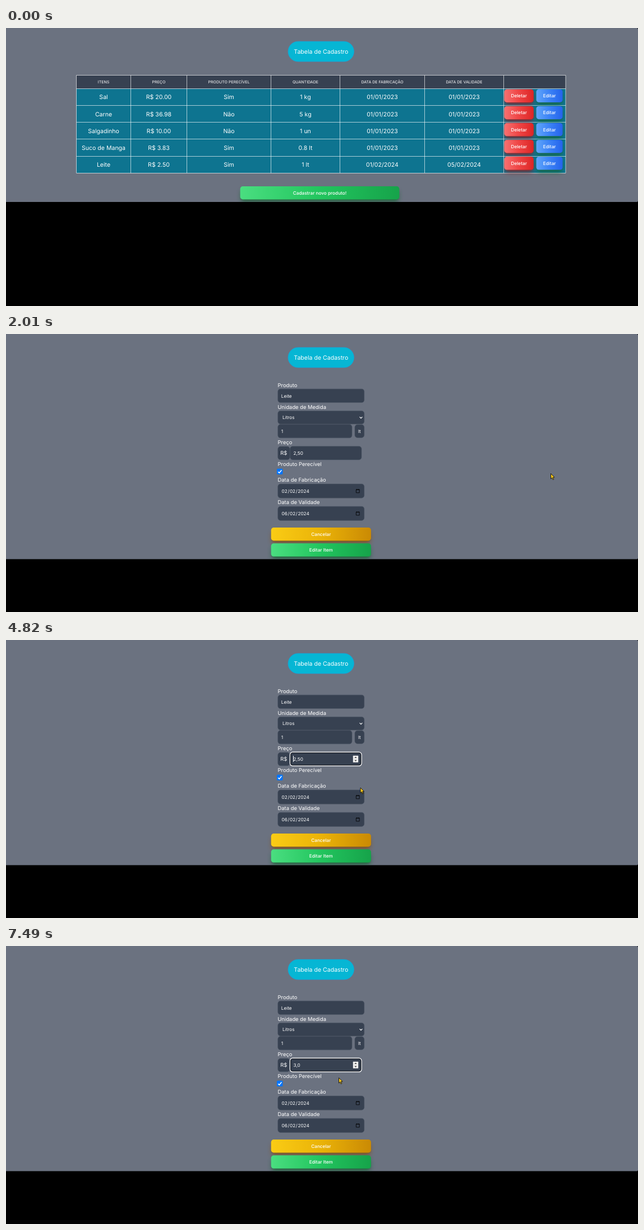
An HTML page for the animation above (8000 ms loop, 1127 px wide and 497 px high).

```html
<!DOCTYPE html>
<html lang="pt-BR">
<head>
<meta charset="utf-8">
<title>Tabela de Cadastro</title>
<style>
  html, body { margin: 0; width: 100%; height: 100%; overflow: hidden; background: #000; }
  svg { display: block; width: 100vw; height: 100vh; }
  text { font-family: Inter, sans-serif; fill: #fff; text-rendering: geometricPrecision; white-space: pre; }
  .medium { font-weight: 500; }
  .field { fill: #374151; stroke: #4b5563; stroke-width: .6; }
  .grid { stroke: #fff; stroke-width: .65; fill: none; }
  .far { filter: blur(4.4px); }
  .near { filter: blur(1.7px); }
</style>
</head>
<body>
<svg id="stage" viewBox="0 0 1127 497">
  <defs id="defs">
    <clipPath id="tableClip"><rect x="-9" width="1136" height="311" rx="2.5"/></clipPath>
    <clipPath id="formClip"><rect x="-9" width="1136" height="402.5" rx="2.5"/></clipPath>
  </defs>
  <rect width="1127" height="497"/>
  <g id="table" clip-path="url(#tableClip)"></g>
  <g id="form" clip-path="url(#formClip)"></g>
  <g id="pointer">
    <circle id="click" r="7.6" fill="#e6e05a" opacity=".5"/>
    <path id="arrow" d="M0 0V9.4L2.1 7.5 3.8 11 5.3 10.3 3.7 6.9 6.6 6.6Z" fill="#f6c51c" stroke="#111" stroke-width=".9" stroke-linejoin="round"/>
    <path id="hand" d="M-.9 .6Q0-.4 .9 .6V5L4.6 5.8Q5.6 6.2 5.4 7.4L4.6 11.8H-.4L-3.2 7.6Q-2.6 6.4-.9 7.6Z" fill="#f6c51c" stroke="#1b1b10" stroke-width=".9" stroke-linejoin="round"/>
    <g id="beam" fill="none">
      <path d="M-2-4.6H2M0-4.6V5M-2 5H2" stroke="#111" stroke-width="2.2"/>
      <path d="M-1.6-4.6H1.6M0-4.6V5M-1.6 5H1.6" stroke="#f0b90f" stroke-width="1"/>
    </g>
  </g>
</svg>
<script>
const LOOP = 8000, STEP = 1000 / 15;
const SM = 8.22, MD = 9.39, LG = 10.57, XS = 7.04;
const $ = id => document.getElementById(id);

function add(parent, tag, attrs, content) {
  const node = document.createElementNS('http://www.w3.org/2000/svg', tag);
  for (const key in attrs) node.setAttribute(key, attrs[key]);
  if (content !== undefined) node.textContent = content;
  parent.append(node);
  return node;
}

function gradient(id, colors, diagonal) {
  const node = add($('defs'), 'linearGradient', { id, x2: 1, y2: diagonal ? 1 : 0 });
  colors.forEach((color, i) => add(node, 'stop', { offset: i / 2, 'stop-color': color }));
}
const blues = ['#60a5fa', '#3b82f6', '#2563eb'];
gradient('red', ['#f87171', '#ef4444', '#dc2626']);
gradient('blue', blues);
gradient('blueHover', blues, true);
gradient('green', ['#4ade80', '#22c55e', '#16a34a']);
gradient('yellow', ['#facc15', '#eab308', '#ca8a04']);

// cy is the middle of the line box
function label(parent, str, x, cy, size, anchor = 'middle', cls = '') {
  return add(parent, 'text', { x, y: cy + size * .36, 'font-size': size, 'text-anchor': anchor, class: cls }, str);
}

const rect = (parent, x, y, width, height, rx, attrs) =>
  add(parent, 'rect', { x, y, width, height, rx, ...attrs });

function button(parent, str, x, y, w, color, shadow) {
  const h = 23.5;
  const tint = { fill: shadow, opacity: .8 };
  rect(parent, x + 1.8, y + 7.7, w - 3.6, h - 3.6, 3, { ...tint, class: 'far' });
  rect(parent, x + 2.3, y + 4.6, w - 4.6, h - 4.6, 3, { ...tint, class: 'near' });
  const face = rect(parent, x, y, w, h, 4.7, { fill: `url(#${color})` });
  label(parent, str, x + w / 2, y + h / 2 + .1, SM, 'middle', 'medium');
  return face;
}

function page(parent) {
  rect(parent, 0, 0, 1127, 497, 0, { fill: '#6b7280' });
  rect(parent, 503, 24, 117.5, 36, 18, { fill: '#06b6d4', stroke: '#189fdc', 'stroke-width': .7 });
  label(parent, 'Tabela de Cadastro', 561.8, 42, LG);
}

function buildTable(g) {
  page(g);
  const cols = [125.5, 222.5, 322.5, 472.5, 595.5, 746.5, 887.5, 998];
  const top = 84.5, first = 108.5, pitch = 30.15, bottom = first + 5 * pitch;
  const heads = ['ITENS', 'PREÇO', 'PRODUTO PERECÍVEL', 'QUANTIDADE', 'DATA DE FABRICAÇÃO', 'DATA DE VALIDADE'];
  const rows = [
    ['Sal', 'R$ 20.00', 'Sim', '1 kg', '01/01/2023', '01/01/2023'],
    ['Carne', 'R$ 36.98', 'Não', '5 kg', '01/01/2023', '01/01/2023'],
    ['Salgadinho', 'R$ 10.00', 'Não', '1 un', '01/01/2023', '01/01/2023'],
    ['Suco de Manga', 'R$ 3.83', 'Sim', '0.8 lt', '01/01/2023', '01/01/2023'],
    ['Leite', 'R$ 2.50', 'Sim', '1 lt', '01/02/2024', '05/02/2024']
  ];
  const middle = i => (cols[i] + cols[i + 1]) / 2;
  rect(g, cols[0], top, 872.5, first - top, 0, { fill: '#374151' });
  rect(g, cols[0], first, 872.5, bottom - first, 0, { fill: '#0e7490' });
  let lines = `M125.5 ${top}H998`;
  for (let i = 0; i <= 5; i++) lines += `M125.5 ${Math.floor(first + i * pitch) + .5}H998`;
  for (const x of cols) lines += `M${x} ${top}V${bottom}`;
  add(g, 'path', { d: lines, class: 'grid' });
  heads.forEach((str, i) => label(g, str, middle(i), 96.3, XS));
  let edit;
  rows.forEach((row, r) => {
    const y = first + r * pitch;
    row.forEach((str, i) => label(g, str, middle(i), y + 15.1, LG));
    button(g, 'Deletar', 888.5, y + 1, 52.4, 'red', '#991b1b');
    edit = button(g, 'Editar', 945.6, y + 1, 47, 'blue', '#166534');
  });
  button(g, 'Cadastrar novo produto!', 417.6, 283, 283.8, 'green', '#166534');
  return edit;
}

function dateField(g, y, day, month) {
  rect(g, 484.8, y, 154, 25.2, 4.7, { class: 'field' });
  const t = label(g, '', 491.6, y + 12.8, SM, 'start');
  [day, '/', month, '/', '2024'].forEach((part, i) => add(t, 'tspan', { dx: i ? .59 : 0 }, part));
  add(g, 'path', { d: `M624.4 ${y + 10}h5.8v5.8h-5.8zM624.4 ${y + 10.6}h5.8M625.6 ${y + 9}v1M629 ${y + 9}v1`, fill: 'none', stroke: '#0b0d10', 'stroke-width': 1 });
}

function buildForm(g) {
  page(g);
  [['Produto', 91.2], ['Unidade de Medida', 130.2], ['Preço', 193.5], ['Produto Perecível', 232.5],
   ['Data de Fabricação', 261], ['Data de Validade', 301]]
    .forEach(([str, y]) => label(g, str, 484.6, y, MD, 'start'));
  const field = (x, y, w, h) => rect(g, x, y, w, h, 4.7, { class: 'field' });
  field(484.8, 98.2, 154, 24.4);
  label(g, 'Leite', 490.8, 110.6, SM, 'start');
  field(484.8, 137.4, 154, 23.6);
  label(g, 'Litros', 493, 149.5, SM, 'start');
  add(g, 'path', { d: 'M630.6 148.2L633 150.6 635.4 148.2', fill: 'none', stroke: '#fff', 'stroke-width': 1.2 });
  field(484.8, 161.6, 132.2, 24.2);
  label(g, '1', 490.8, 174, SM, 'start');
  field(622, 162, 16.8, 23.4);
  label(g, 'lt', 630.4, 173.7, SM);
  field(484.8, 201, 21.4, 23.8);
  label(g, 'R$', 495.3, 213, MD);
  field(506.6, 200.7, 127.4, 24.2);

  const ring = add(g, 'g', {});
  rect(ring, 506.5, 200.6, 127.6, 24.4, 4.7, { fill: '#374151', stroke: '#fff', 'stroke-width': 1.5 });
  rect(ring, 507.7, 201.8, 125.2, 22, 3.7, { fill: 'none', stroke: '#10131a', 'stroke-width': 1.1 });
  const price = label(g, '2,50', 512.5, 212.8, SM, 'start');
  const caret = rect(g, 512, 207, 1, 11, 0, { fill: '#fff' });
  const spin = add(g, 'g', {});
  rect(spin, 618.8, 206.8, 9.4, 12, .5, { fill: '#efefef' });
  add(spin, 'path', { d: 'M621.3 211L623.5 208.6 625.7 211ZM621.3 214.6L623.5 217 625.7 214.6Z', fill: '#4a4a4a' });

  const check = rect(g, 483, 240.7, 10.4, 10.4, 1.5, {});
  add(g, 'path', { d: 'M485.2 246.2L487.3 248.4 491.4 243.2', fill: 'none', stroke: '#fff', 'stroke-width': 1.5 });
  dateField(g, 268, '02', '02');
  dateField(g, 308.2, '06', '02');
  button(g, 'Cancelar', 472.7, 346, 178.2, 'yellow', '#854d0e');
  button(g, 'Editar Item', 472.7, 374.3, 178.2, 'green', '#166534');
  return { ring, price, caret, spin, check };
}

const editButton = buildTable($('table'));
const ui = buildForm($('form'));

// [time, x, y]
const path = [
  [130, 1084, 467], [400, 1036, 366], [650, 990, 287], [870, 976, 261], [1180, 976, 261],
  [1350, 974, 254], [1550, 971.5, 249.5], [2150, 971.5, 249.5], [2270, 935, 240], [2470, 760, 192],
  [2600, 640, 168], [2730, 540, 205], [2870, 494, 261], [2960, 490.5, 254], [3040, 490.5, 254],
  [3200, 489, 249], [3400, 492, 243], [3600, 510, 218], [3730, 515, 210.5], [3830, 515, 210],
  [3880, 545, 224], [3950, 600, 249], [4020, 632, 264], [5700, 632, 264], [5735, 634.5, 264],
  [5800, 615, 254.3], [5850, 614, 253.5], [6000, 600, 240], [6150, 593.5, 235.6], [LOOP, 593.5, 235.6]
];
// [time, price text, caret x or 0 when blinked off]
const typing = [
  [0, '2,50', 0], [3820, '2,50', 512], [4350, '2,50', 0], [4820, '2,50', 512], [4880, ',50', 512],
  [5410, ',50', 0], [5540, '3,50', 517.2], [6040, '3,50', 0], [6630, '3,50', 517.2],
  [6830, '3,50', 520], [6970, '3,0', 520], [7490, '3,0', 0]
];

function position(t) {
  const i = path.findIndex(p => p[0] > t);
  if (i < 0) return path[path.length - 1].slice(1);
  if (i === 0) return path[0].slice(1);
  const a = path[i - 1], b = path[i], k = (t - a[0]) / (b[0] - a[0]);
  return [a[1] + (b[1] - a[1]) * k, a[2] + (b[2] - a[2]) * k];
}

const show = (node, on) => node.setAttribute('visibility', on ? 'inherit' : 'hidden');
const within = (x, y, l, t, r, b) => x >= l && x <= r && y >= t && y <= b;

function render(t) {
  const [x, y] = position(Math.round(t / STEP) * STEP);
  const inForm = t >= 2010;
  const onEdit = !inForm && within(x, y, 945, 230, 993, 254);
  const onPrice = inForm && within(x, y, 506, 200, 634, 225);
  const onText = onPrice || inForm && within(x, y, 485, 161, 617, 186);
  const pressed = t >= 1950 && !inForm;
  show($('table'), !inForm);
  show($('form'), inForm);

  editButton.setAttribute('fill', onEdit ? 'url(#blueHover)' : 'url(#blue)');
  editButton.setAttribute('style', pressed ? 'stroke:#166534;stroke-width:4.6;paint-order:stroke' : '');

  show($('pointer'), t >= 130);
  $('pointer').setAttribute('transform', `translate(${x} ${y})`);
  show($('click'), pressed || t >= 3820 && t < 3880);
  show($('hand'), onEdit);
  show($('beam'), onText);
  show($('arrow'), !onEdit && !onText);

  const [, value, caretX] = typing.findLast(s => s[0] <= t);
  const focused = t >= 3820;
  ui.price.textContent = value;
  ui.caret.setAttribute('x', caretX);
  show(ui.caret, inForm && caretX);
  show(ui.ring, inForm && focused);
  show(ui.spin, inForm && (focused || onPrice));
  ui.check.setAttribute('fill', t >= 2900 && t < 3400 ? '#005cc8' : '#0075ff');
}

const start = performance.now();
function frame() {
  render((performance.now() - start) % LOOP);
  requestAnimationFrame(frame);
}
frame();
</script>
</body>
</html>
```
